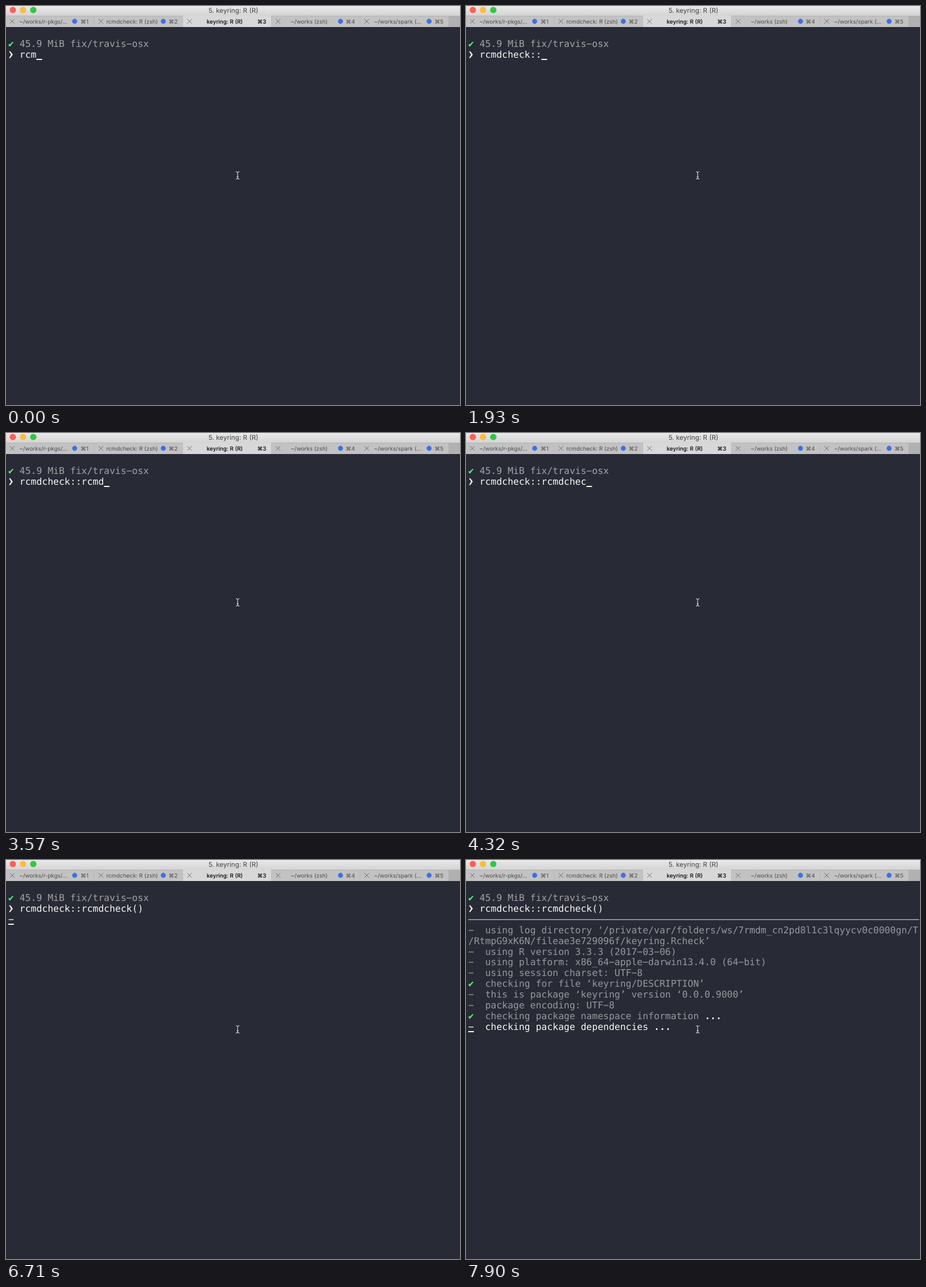
These frames come from a looping animation (798 by 702 pixels, 8 s). An HTML page:

```html
<!DOCTYPE html>
<html lang="en">
<head>
<meta charset="utf-8">
<title>Terminal</title>
<style>
  html, body { margin: 0; width: 100%; height: 100%; overflow: hidden; background: #282a36; }
  svg { display: block; }
  text { white-space: pre; text-rendering: geometricPrecision; }
  .term { font: 16.43px "DejaVu Sans Mono", "DejaVu Sans", monospace; }
  .ui { font: 9.9px Inter, "DejaVu Sans", sans-serif; }
  .title { font-size: 11.7px; fill: #434343; text-anchor: middle; }
  .mid { text-anchor: middle; }
</style>
</head>
<body>
<svg id="stage" width="798" height="702" viewBox="0 0 798 702">
  <defs>
    <linearGradient id="bar" x2="0" y2="1">
      <stop offset="0" stop-color="#e9e9e9"/>
      <stop offset="1" stop-color="#d3d3d3"/>
    </linearGradient>
  </defs>
  <rect width="798" height="702" fill="#282a36"/>
  <rect width="798" height="18" fill="url(#bar)"/>
  <circle cx="12" cy="7" r="5.6" fill="#fc5f5a"/>
  <circle cx="30" cy="7" r="5.6" fill="#fdbc38"/>
  <circle cx="48" cy="7" r="5.6" fill="#2fc845"/>
  <text class="ui title" x="399.7" y="12">5. keyring: R (R)</text>
  <g id="tabs" class="ui"></g>
  <g id="screen" class="term">
    <path d="M5.2 79.8H7.6L12 85.5L7.6 91.4H5.2L9 85.5Z" fill="#f4f4f0"/>
  </g>
  <g id="output" class="term">
    <rect x="4" y="104" width="792.5" height="1.6" fill="#a6a6a8"/>
  </g>
  <rect id="caret" width="9.9" height="2" fill="#f8f8f2"/>
  <path d="M404 291.5Q406.6 291.5 407.2 293.2Q407.8 291.5 410.4 291.5M407.2 293V303M404 304.5Q406.6 304.5 407.2 302.8Q407.8 304.5 410.4 304.5M405.6 300.5H408.8"
    fill="none" stroke="#e4e4e4" stroke-width="1.1"/>
</svg>
<script>
const LOOP = 8000, LEFT = 4, COL = 9.89, TOP = 72, ROW = 18.9;
const WHITE = '#f8f8f2', GREY = '#a3a3a5', DIM = '#98989c', GREEN = '#50fa7b';
const $ = id => document.getElementById(id);

function add(parent, tag, attrs, content = '') {
  const node = document.createElementNS('http://www.w3.org/2000/svg', tag);
  for (const key in attrs) node.setAttribute(key, attrs[key]);
  node.textContent = content;
  return parent.appendChild(node);
}

// The terminal face has wide hyphens, so they are shown as minus signs.
const wide = s => s.replace(/-/g, '\u2212');

function print(parent, col, row, s, fill, weight = 400) {
  return add(parent, 'text',
    { x: LEFT + col * COL, y: TOP + row * ROW, fill, 'font-weight': weight }, wide(s));
}

// Tab bar
const tabs = ['~/works/r-pkgs/…', 'rcmdcheck: R (zsh)', 'keyring: R (R)', '~/works (zsh)', '~/works/spark (…'];
const centers = [65.5, 221.5, 384.5, 533, 688.5];
const bar = $('tabs');
add(bar, 'rect', { y: 17, width: 798, height: 20, fill: '#b1b1b1' });
tabs.forEach((name, i) => {
  const x = i * 155.75, active = i === 2, ink = active ? '#000' : '#4c4c4c';
  add(bar, 'rect', { x: x - 0.5, y: 17, width: 155.2, height: 20, fill: active ? '#d8d8d8' : '#c2c2c2' });
  if (!active) add(bar, 'rect', { x: x - 0.5, y: 17, width: 155.2, height: 1, fill: '#b3b3b3' });
  add(bar, 'path', { d: `M${x + 7} 23l8 8m0 -8l-8 8`, stroke: '#6f6f6f', 'stroke-width': 1 });
  add(bar, 'text', { class: 'mid', x: centers[i], y: 30.6, fill: ink, 'font-weight': active ? 500 : 400 }, name);
  if (!active) add(bar, 'circle', { cx: x + 120.7, cy: 27, r: 4.4, fill: '#3d70e2' });
  add(bar, 'text', { class: 'mid', x: x + 138, y: 30.6, fill: ink, 'font-weight': active ? 500 : 400 }, '⌘' + (i + 1));
});

// Prompt
const screen = $('screen'), output = $('output');
print(screen, 0, 0, '✔', GREEN);
print(screen, 2, 0, '45.9 MiB fix/travis-osx', GREY);
const command = print(screen, 2, 1, '', WHITE);
const spinner = print(screen, 0, 2, '', WHITE);

// Check log: a leading "+" is a passed check, "-" a note
[
  '-using log directory ‘/private/var/folders/ws/7rmdm_cn2pd8l1c3lqyycv0c0000gn/T',
  ' /RtmpG9xK6N/fileae3e729096f/keyring.Rcheck’',
  '-using R version 3.3.3 (2017-03-06)',
  '-using platform: x86_64-apple-darwin13.4.0 (64-bit)',
  '-using session charset: UTF-8',
  '+checking for file ‘keyring/DESCRIPTION’',
  '-this is package ‘keyring’ version ‘0.0.0.9000’',
  '-package encoding: UTF-8',
  '+checking package namespace information'
].forEach((line, i) => {
  const mark = line[0], row = i + 3;
  if (mark === '+') print(output, 0, row, '✔', GREEN);
  if (mark === '-') print(output, 0, row, '-', DIM);
  print(output, mark === ' ' ? 0 : 3, row, line.slice(1), DIM);
});
print(output, 42, 11, '...', WHITE, 700);
print(output, 3, 12, 'checking package dependencies', WHITE);
print(output, 33, 12, '...', WHITE, 700);

// Steps of [start time, value]
const typed = [[0, 3], [150, 4], [900, 6], [1040, 7], [1190, 9], [1780, 10], [1930, 11], [2980, 12],
  [3270, 13], [3420, 14], [3570, 15], [4170, 17], [4320, 19], [4470, 20], [4770, 22]];
const spins = [[0, ''], [6710, '-'], [6860, '|'], [7010, '/'], [7160, '-'], [7460, '|'], [7600, '/'], [7900, '-']];
const ENTER = 5060, LOG = 6860;

const at = (steps, t) => steps.reduce((value, step) => t >= step[0] ? step[1] : value, steps[0][1]);

function draw() {
  const t = performance.now() % LOOP;
  const count = at(typed, t);
  const row = t < ENTER ? 1 : t < LOG ? 2 : 12;
  const col = t < ENTER ? count + 2 : 0;
  command.textContent = 'rcmdcheck::rcmdcheck()'.slice(0, count);
  spinner.textContent = wide(at(spins, t));
  spinner.setAttribute('y', TOP + row * ROW);
  output.style.display = t < LOG ? 'none' : '';
  $('caret').setAttribute('x', LEFT + col * COL);
  $('caret').setAttribute('y', Math.round(TOP + row * ROW + 2.3));
  requestAnimationFrame(draw);
}
draw();
</script>
</body>
</html>
```
